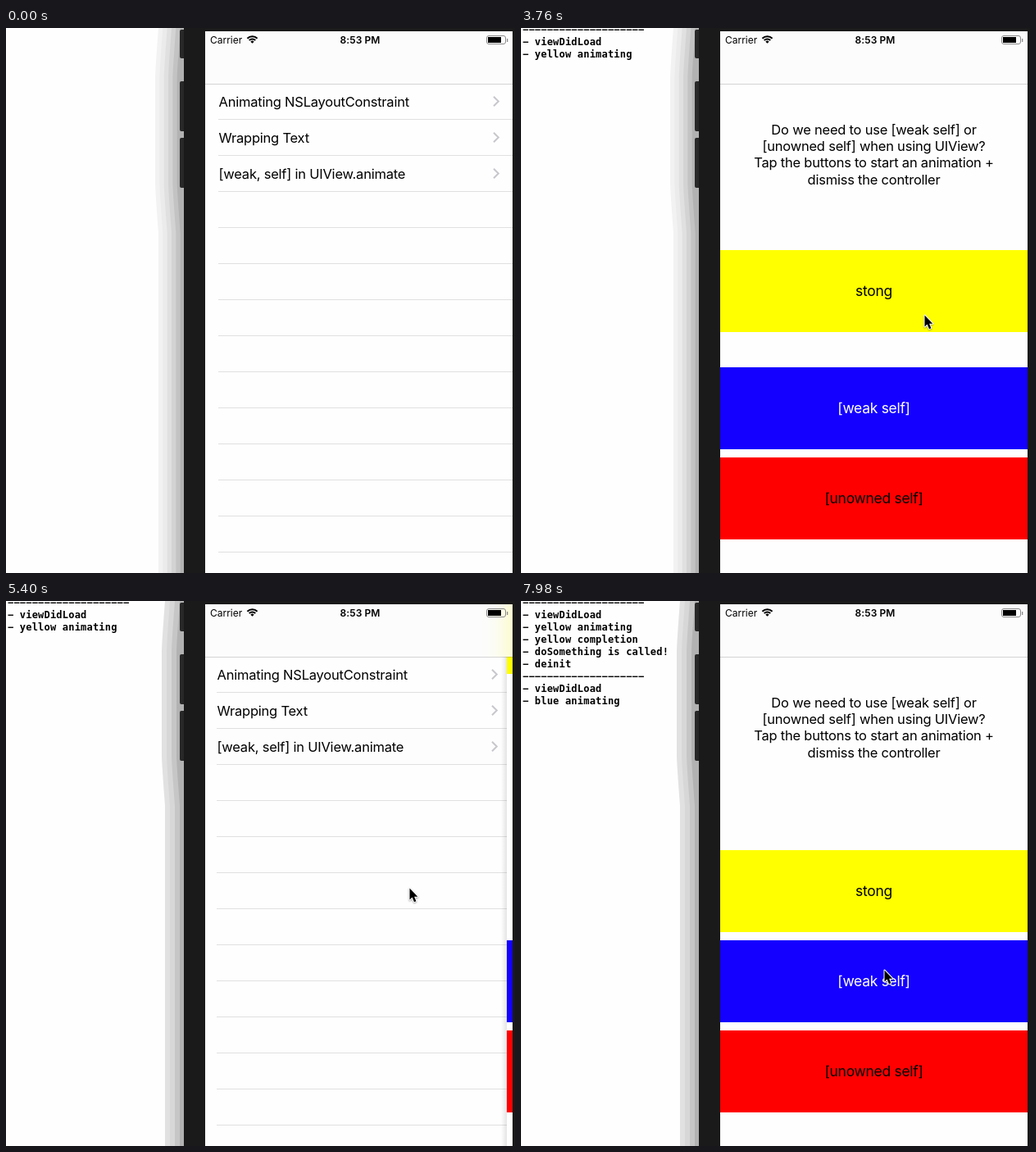
Recreate the animation shown at these times as an HTML page with a canvas. Size 621 by 665 pixels, loop 8 s.

```html
<!DOCTYPE html>
<html lang="en">
<head>
<meta charset="utf-8">
<title>Closures in view animations</title>
<style>
html, body { margin: 0; width: 100%; height: 100%; overflow: hidden; background: #fefefe; }
canvas { display: block; }
</style>
</head>
<body>
<canvas id="stage" width="621" height="665"></canvas>
<script>
const ctx = document.getElementById('stage').getContext('2d');
const LOOP = 8000;
const HOLD = 86.5;
const SCREEN = { x: 243, y: 4, w: 375, h: 661 };
const BAR_BOTTOM = 68;
const ROW_HEIGHT = 44;
const SANS = 'Inter, "Open Sans", sans-serif';
const MONO = '"DejaVu Sans Mono", monospace';

const SCENES = [810, 1810, 3070, 6090, 6800, 7890];

// Pointer moves: start, end and the point reached.
const MOVES = [
  [810, 1190, 514, 201], [1400, 1640, 538, 176], [2480, 2900, 492, 350],
  [6030, 6600, 505, 181], [7000, 7620, 443, 450]
];

const RULE = '\u2212'.repeat(20);
const LOG = [
  [1810, RULE], [1810, '\u2212 viewDidLoad'], [3070, '\u2212 yellow animating'],
  [5520, '\u2212 yellow completion'], [5520, '\u2212 doSomething is called!'],
  [5610, '\u2212 deinit'], [6800, RULE], [6800, '\u2212 viewDidLoad'],
  [7890, '\u2212 blue animating']
];

const ROWS = ['Animating NSLayoutConstraint', 'Wrapping Text', '[weak, self] in UIView.animate'];
const QUESTION = [
  'Do we need to use [weak self] or',
  '[unowned self] when using UIView?',
  'Tap the buttons to start an animation +',
  'dismiss the controller'
];

const clamp = v => Math.max(0, Math.min(1, v));
const smooth = u => u * u * (3 - 2 * u);

// Motion is held between refreshes, counted from the start of each scene.
function snap(t) {
  const start = SCENES.filter(s => s <= t).pop() || 0;
  return start + Math.floor((t - start) / HOLD + 0.05) * HOLD;
}

// Critically damped spring from 0 to 1.
function spring(ms) {
  const u = Math.max(0, ms) * 0.0193;
  return u > 8 ? 1 : 1 - (1 + u) * Math.exp(-u);
}

// cubic-bezier(.42, 0, .58, 1), solved by halving.
function easeInOut(x) {
  let low = 0, high = 1;
  for (let i = 0; i < 20; i++) {
    const s = (low + high) / 2, r = 1 - s;
    if (1.26 * s * r * r + 1.74 * s * s * r + s * s * s < x) low = s;
    else high = s;
  }
  return smooth(low);
}

const rise = ms => 447 * easeInOut(clamp(ms / 3600));

function pointerAt(t) {
  let x = 373, y = 638;
  for (const [start, end, toX, toY] of MOVES) {
    const u = smooth(clamp((t - start) / (end - start)));
    x += (toX - x) * u;
    y += (toY - y) * u;
  }
  return [x, y];
}

function rect(x, y, w, h, color) {
  ctx.fillStyle = color;
  ctx.fillRect(x, y, w, h);
}

function text(str, x, y, { size = 16.5, color = '#000', align = 'left', weight = 400, spacing = -0.22, family = SANS } = {}) {
  ctx.font = `${weight} ${size}px ${family}`;
  ctx.letterSpacing = spacing + 'px';
  ctx.textAlign = align;
  ctx.fillStyle = color;
  ctx.fillText(str, x, y);
}

// Stepped shadow that bulges beside the side buttons.
function drawShadow(left, light, bands) {
  for (let i = 0; i < bands; i++) {
    const x = left + (218 - left) * i / bands;
    const gray = light - (light - 178) * Math.pow(i / (bands - 1), 1.4);
    ctx.fillStyle = `rgb(${gray},${gray},${gray})`;
    ctx.beginPath();
    ctx.moveTo(218, 0);
    for (let y = 0; y <= 250; y += 10) {
      ctx.lineTo(x - 4 * Math.min(1, 1.5 * Math.sin(Math.PI * y / 250)), y);
    }
    ctx.lineTo(x, 665);
    ctx.lineTo(218, 665);
    ctx.fill();
  }
}

function drawPhone(coarse) {
  if (coarse) drawShadow(194, 225, 4);
  else drawShadow(186, 242, 6);
  ctx.fillStyle = '#282828';
  for (const [y, h] of [[2, 35], [65, 61], [134, 61]]) {
    ctx.beginPath();
    ctx.roundRect(212, y, 9, h, 2);
    ctx.fill();
  }
  rect(217, 0, 404, 665, '#1a1a1a');
}

function drawLog(t) {
  LOG.forEach(([at, line], i) => {
    if (t >= at) text(line, 2, 6 + i * 15, { size: 12, weight: 700, spacing: 0.196, family: MONO });
  });
}

function drawList(p, highlight) {
  const { x, y, w, h } = SCREEN;
  ctx.save();
  ctx.translate(Math.round(-0.3 * w * p), 0);
  rect(x, y, w, h, '#fefefe');
  if (highlight > 0) rect(x, 156, w, ROW_HEIGHT, `rgba(217,217,217,${highlight})`);
  for (let line = 111; line < 665; line += ROW_HEIGHT) rect(259, line, 359, 1, '#e0e0e1');
  ROWS.forEach((row, i) => {
    const mid = 89.5 + i * ROW_HEIGHT;
    text(row, 259.5, mid + 6.2);
    ctx.strokeStyle = '#c7c7cc';
    ctx.lineWidth = 2;
    ctx.beginPath();
    ctx.moveTo(595, mid - 5.8);
    ctx.lineTo(600.8, mid);
    ctx.lineTo(595, mid + 5.8);
    ctx.stroke();
  });
  ctx.restore();
  rect(x, y, w, h, `rgba(0,0,0,${0.1 * p})`);
}

function drawButton(top, fill, label, color) {
  rect(SCREEN.x, top, SCREEN.w, 100, fill);
  text(label, 430.5, top + 56, { size: 17.5, color, align: 'center', spacing: -0.3 });
}

function drawDetail(offset, yellow, blue) {
  const { x, y, w, h } = SCREEN;
  ctx.save();
  ctx.translate(offset, 0);
  if (offset > 0) {
    const edge = ctx.createLinearGradient(x - 7, 0, x, 0);
    edge.addColorStop(0, 'rgba(0,0,0,0)');
    edge.addColorStop(1, 'rgba(0,0,0,0.1)');
    rect(x - 7, y, 7, h, edge);
  }
  rect(x, y, w, h, '#fefefe');
  QUESTION.forEach((line, i) => text(line, 430.5, 130 + i * 20.2, { align: 'center' }));
  drawButton(yellow, '#ffff00', 'stong', '#000');
  drawButton(blue, '#1400ff', '[weak self]', '#fff');
  drawButton(524, '#ff0000', '[unowned self]', '#000');
  ctx.restore();
}

// Translucent bar: what lies below shows through as a soft tint.
function drawBar(p, offset, yellow) {
  const { x, y, w } = SCREEN;
  const height = BAR_BOTTOM - y;
  rect(x, y, w, height, '#fcfcfc');
  ctx.save();
  ctx.beginPath();
  ctx.rect(x, y, w, height);
  ctx.clip();
  ctx.filter = 'blur(14px)';
  if (p > 0 && p < 1) rect(x - 40, y - 40, offset + 40, height + 80, `rgba(0,0,0,${0.03 * p})`);
  if (p > 0 && yellow < BAR_BOTTOM) rect(x + offset, yellow, w + 40, 100, 'rgba(255,255,0,0.25)');
  ctx.restore();
  rect(x, BAR_BOTTOM, w, 1, 'rgba(0,0,0,0.17)');
}

function drawStatus() {
  text('Carrier', 249, 18.5, { size: 12, spacing: 0 });
  text('8:53 PM', 432, 18.5, { size: 12, weight: 600, align: 'center', spacing: 0.1 });

  ctx.strokeStyle = ctx.fillStyle = '#000';
  ctx.lineWidth = 2;
  const arc = [-Math.PI * 0.75, -Math.PI * 0.25];
  for (const r of [8.6, 5.3]) {
    ctx.beginPath();
    ctx.arc(300.5, 18.8, r, ...arc);
    ctx.stroke();
  }
  ctx.beginPath();
  ctx.moveTo(300.5, 18.8);
  ctx.arc(300.5, 18.8, 3, ...arc);
  ctx.fill();

  ctx.strokeStyle = '#8a8a8a';
  ctx.lineWidth = 1;
  ctx.beginPath();
  ctx.roundRect(586.5, 9.5, 23, 10, 2.5);
  ctx.stroke();
  rect(588, 11, 16, 7, '#000');
  rect(611, 13, 1.3, 4, '#8a8a8a');
}

function drawPointer(x, y) {
  const arrow = new Path2D('M.5 .5V14.5L3.6 11.6 6 17.2 8.4 16.2 6.1 10.8H10.3Z');
  ctx.save();
  ctx.translate(Math.round(x), Math.round(y));
  ctx.lineJoin = 'round';
  ctx.lineWidth = 2;
  ctx.strokeStyle = '#fff';
  ctx.shadowColor = 'rgba(0,0,0,0.35)';
  ctx.shadowBlur = 2;
  ctx.shadowOffsetY = 1;
  ctx.stroke(arrow);
  ctx.shadowColor = 'transparent';
  ctx.fillStyle = '#000';
  ctx.fill(arrow);
  ctx.restore();
}

function draw(time) {
  const t = snap(time);
  const again = time >= 6800;
  const popping = t > 5012 && !again;

  // p is how far the detail screen has slid in.
  const p = again ? spring(t - 6800)
    : popping ? 1 - spring(t - 5012)
    : time >= 1810 ? spring(t - 1797.8) : 0;
  const offset = Math.round(SCREEN.w * (1 - p));
  const yellow = Math.round(304 - (again ? 0 : rise(t - 3074)));
  const blue = Math.round(414 - rise(t - 7890));
  const highlight = popping ? clamp(p / 0.7) : time >= 1810 ? 1 : 0;

  rect(0, 0, 621, 665, '#fefefe');
  drawPhone(time >= 5160);
  drawLog(time);

  ctx.save();
  ctx.beginPath();
  ctx.rect(SCREEN.x, SCREEN.y, SCREEN.w, SCREEN.h);
  ctx.clip();
  if (p < 1) drawList(p, highlight);
  if (p > 0) drawDetail(offset, yellow, blue);
  drawBar(p, offset, yellow);
  drawStatus();
  if (time >= 810) drawPointer(...pointerAt(t));
  ctx.restore();
}

const begin = performance.now();
function tick() {
  draw((performance.now() - begin) % LOOP);
  requestAnimationFrame(tick);
}
tick();
</script>
</body>
</html>
```
